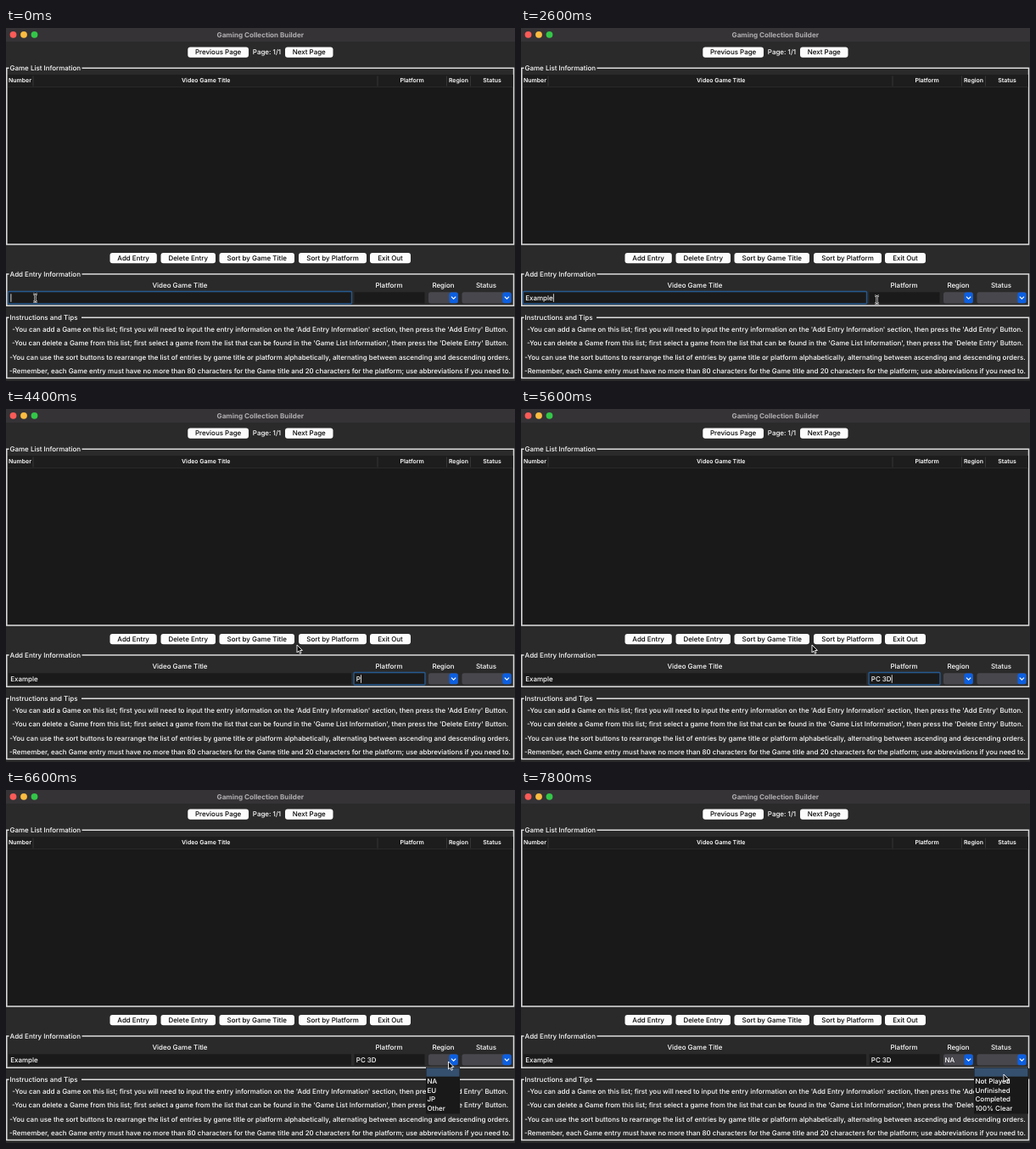
An HTML page for the animation above (8000 ms loop, 600 by 416 pixels).

```html
<!DOCTYPE html>
<html lang="en">
<head>
<meta charset="utf-8">
<title>Gaming Collection Builder</title>
<style>
  html, body { margin: 0; width: 100%; height: 100%; overflow: hidden; background: #2a2a2a; }
  svg { display: block; width: 100vw; height: 100vh; }
  text { font: 500 7.96px Inter, "Open Sans", sans-serif; fill: #fff; text-rendering: geometricPrecision; white-space: pre; }
  .mid { text-anchor: middle; }
  .title { font-size: 8.1px; font-weight: 700; fill: #b0aeb0; }
  .dark { fill: #000; }
  .head { font-size: 6.95px; font-weight: 600; }
  .frame { fill: none; stroke: #dedede; stroke-width: 1.5; }
  .focus { fill: none; stroke: #25588f; stroke-width: 1.4; }
</style>
</head>
<body>
<svg id="stage" viewBox="0 0 600 416"></svg>
<script>
const LOOP = 8000, STEP = 200;
const stage = document.getElementById('stage');

const text = (x, y, str, cls = '', id = '') => `<text x="${x}" y="${y}" class="${cls}" id="${id}">${str}</text>`;
const label = (x, y, str, cls = '') => text(x, y, str, 'mid ' + cls);
const rect = (x1, y1, x2, y2, fill, r = 0, extra = '') =>
  `<rect x="${x1}" y="${y1}" width="${x2 - x1}" height="${y2 - y1}" rx="${r}" fill="${fill}" ${extra}/>`;

const button = (x1, x2, y, str) =>
  rect(x1, y, x2, y + 12.3, '#fcfcfc', 3) + label((x1 + x2) / 2, y + 8.8, str, 'dark');

const group = (top, bottom, gapEnd, str) =>
  `<path class="frame" d="M${gapEnd} ${top}H598.5V${bottom}H.8V${top}H3.5"/>` + text(4.6, top + 2.9, str);

const entry = (x1, x2, id) =>
  rect(x1 + 1, 311.3, x2 - 1, 324.5, '#1a1a1a') +
  rect(x1 + .5, 310.5, x2 - .5, 325, 'none', 1, `class="focus" id="${id}Focus"`) +
  text(x1 + 3.3, 320.8, '', '', id + 'Text') +
  rect(0, 313.3, .8, 322.8, '#fff', 0, `id="${id}Caret"`);

const combo = (x1, x2) =>
  rect(x1, 311.3, x2, 324.5, '#48474d', 2.5) +
  rect(x2 - 10.5, 311.6, x2 - .3, 324.2, '#0c5fe0', 2.5) +
  `<path d="M${x2 - 8} 316.6l2.6 2.6l2.6 -2.6" fill="none" stroke="#fff" stroke-width="1.2"/>`;

const menu = (x1, x2, id, items) =>
  `<g id="${id}">` + rect(x1, 326.5, x2, 381.5, '#191919') +
  rect(x1 + .5, 327.5, x2 - .5, 337.7, '#35506e', 0, `id="${id}Row"`) +
  items.map((item, i) => text(x1 + 1.5, 345.9 + i * 10.75, item)).join('') + '</g>';

const headers = [[16.5, 'Number'], [235.7, 'Video Game Title'], [478.7, 'Platform'], [533.5, 'Region'], [573, 'Status']];
const tips = [
  "-You can add a Game on this list; first you will need to input the entry information on the 'Add Entry Information' section, then press the 'Add Entry' Button.",
  "-You can delete a Game from this list; first select a game from the list that can be found in the 'Game List Information', then press the 'Delete Entry' Button.",
  '-You can use the sort buttons to rearrange the list of entries by game title or platform alphabetically, alternating between ascending and descending orders.',
  '-Remember, each Game entry must have no more than 80 characters for the Game title and 20 characters for the platform; use abbreviations if you need to.'
];
const beam = 'M-2.4 -4.6Q0 -4.6 0 -3Q0 -4.6 2.4 -4.6M0 -3V3M-2.4 4.6Q0 4.6 0 3Q0 4.6 2.4 4.6M-1.2 1H1.2';

stage.innerHTML = [
  rect(0, 0, 600, 416, '#2a2a2a'),
  rect(0, 0, 600, 16, '#353336'),
  ...['#fc5b57', '#fdbc40', '#33c748'].map((c, i) => `<circle cx="${8.5 + i * 12.5}" cy="7.8" r="3.9" fill="${c}"/>`),
  label(299.8, 10.8, 'Gaming Collection Builder', 'title'),
  button(214.3, 286, 22.5, 'Previous Page'),
  label(307.5, 31.2, 'Page: 1/1'),
  button(329, 385.5, 22.5, 'Next Page'),

  group(47.2, 254.9, 89.5, 'Game List Information'),
  rect(2, 55, 597.5, 254, '#191919'),
  rect(2, 55, 597.5, 69.5, '#1d1d1d'),
  rect(2, 69, 597.5, 69.7, '#303030'),
  ...[32, 438, 519.5, 547.5].map(x => rect(x - .4, 56.5, x + .4, 68.5, '#3c3c3c')),
  ...headers.map(([x, str]) => label(x, 64.3, str, 'head')),

  button(122.5, 177.8, 264.9, 'Add Entry'),
  button(182.5, 247, 264.9, 'Delete Entry'),
  button(251.5, 340, 264.9, 'Sort by Game Title'),
  button(345, 425, 264.9, 'Sort by Platform'),
  button(429, 477, 264.9, 'Exit Out'),

  group(290, 327.3, 89.5, 'Add Entry Information'),
  label(205, 305.7, 'Video Game Title'),
  label(451.5, 305.7, 'Platform'),
  label(515.5, 305.7, 'Region'),
  label(566, 305.7, 'Status'),
  entry(2, 408, 'game'),
  entry(409.5, 494.5, 'platform'),
  combo(498, 533),
  combo(537.5, 595.8),
  text(499.5, 320.8, 'NA', '', 'regionText'),

  group(341.3, 412.5, 89, 'Instructions and Tips'),
  ...tips.map((tip, i) => label(299.5, 358 + i * 16.3, tip)),

  menu(495, 535, 'regionMenu', ['NA', 'EU', 'JP', 'Other']),
  menu(534, 598, 'statusMenu', ['Not Played', 'Unfinished', 'Completed', '100% Clear']),
  `<g id="beam" fill="none"><path d="${beam}" stroke="#fff" stroke-width="2"/><path d="${beam}" stroke="#222" stroke-width=".8"/></g>`,
  '<path id="arrow" d="M0 0V9L2.1 7.1L3.5 10.3L5 9.6L3.6 6.5H6.4Z" fill="#000" stroke="#fff" stroke-width=".9"/>'
].join('');

const el = id => document.getElementById(id);
const show = (id, on) => el(id).setAttribute('visibility', on ? 'visible' : 'hidden');

// Times at which each character is typed
const gameKeys = [600, 800, 1200, 1400, 1600, 1800, 2000];
const platformKeys = [4200, 4600, 5000, 5400, 5600];
const typed = (str, keys, t) => str.slice(0, keys.filter(k => k <= t).length);

// Pointer path: time, x, y
const path = [
  [0, 34.5, 318], [2000, 34.5, 318], [2400, 300, 323], [2600, 419.5, 320], [2800, 421, 319],
  [3000, 418, 318], [3400, 343, 278], [5800, 343, 278], [6400, 521, 319], [6600, 521.5, 320],
  [7000, 507, 340], [7200, 507, 340], [7600, 574, 320], [7800, 569, 335], [LOOP, 569, 335]
];

function pointer(t) {
  const i = path.findIndex(([time]) => time > t);
  const [t0, x0, y0] = path[i - 1], [t1, x1, y1] = path[i];
  const k = (t - t0) / (t1 - t0);
  return [x0 + (x1 - x0) * k, y0 + (y1 - y0) * k];
}

function setEntry(id, str, focused, caretOn) {
  const node = el(id + 'Text');
  if (node.textContent !== str) node.textContent = str;
  show(id + 'Focus', focused);
  show(id + 'Caret', focused && caretOn);
  const end = str ? node.getComputedTextLength() : 0;
  el(id + 'Caret').setAttribute('x', +node.getAttribute('x') + end + .2);
}

function draw(now) {
  const t = Math.floor(now % LOOP / STEP) * STEP;
  setEntry('game', typed('Example', gameKeys, t), t < 2800, true);
  setEntry('platform', typed('PC 3D', platformKeys, t), t >= 2800 && t < 6600, t < 3400 || t >= 4000);

  show('regionText', t >= 7200);
  show('regionMenu', t >= 6600 && t < 7200);
  show('statusMenu', t >= 7600);
  el('regionMenuRow').setAttribute('y', t < 7000 ? 327.5 : 338);

  const isBeam = t < 3200;
  show('beam', isBeam);
  show('arrow', !isBeam);
  el(isBeam ? 'beam' : 'arrow').setAttribute('transform', `translate(${pointer(t)})`);
}

let start;
function tick(now) {
  start ??= now;
  draw(now - start);
  requestAnimationFrame(tick);
}
draw(0);
requestAnimationFrame(tick);
</script>
</body>
</html>
```
